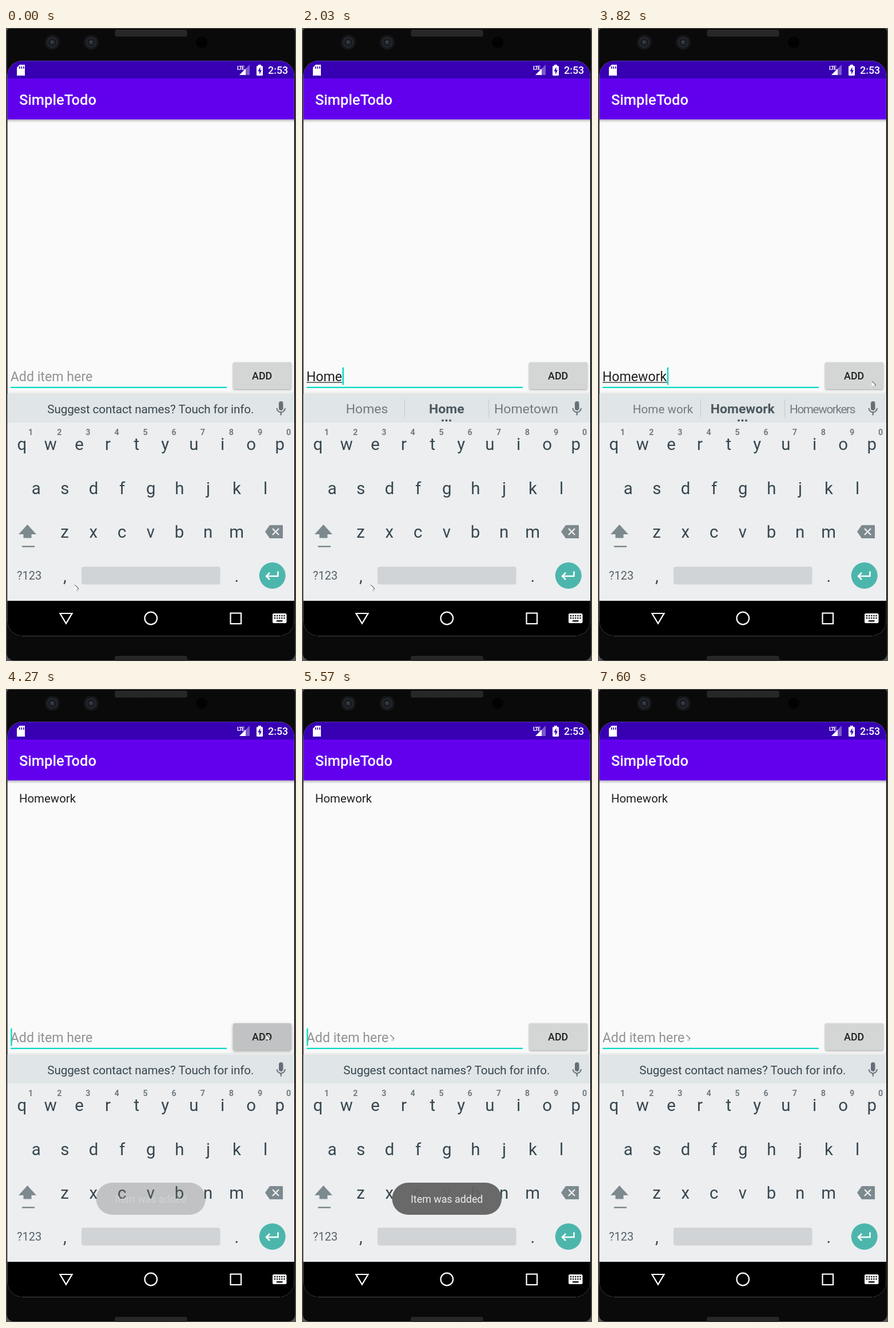
These frames come from a looping animation (507 px wide and 1104 px high, 8 s). An HTML page with a canvas:

```html
<!DOCTYPE html>
<html lang="en">
<head>
<meta charset="utf-8">
<title>Todo app</title>
<style>
  html, body { margin: 0; width: 100%; height: 100%; overflow: hidden; background: #0a0a0a; }
  canvas { display: block; }
</style>
</head>
<body>
<canvas id="stage" width="507" height="1104"></canvas>
<script>
const ctx = document.getElementById('stage').getContext('2d');
const LOOP = 8000;
const FONT = 'Roboto, sans-serif';
const SP = 1.276; // stage pixels per scaled text unit
const NOTICE = 'Suggest contact names? Touch for info.';
const INK = '#202020', KEY = '#37474f', ICON = '#7c898f', TEAL = '#03dac5', KEYS_BG = '#eceef0';

const WORD = 'Homework';
const TYPE_START = 1490, TYPE_STEP = 150, TYPE_END = 2780;
const CLEAR = 4120, ADDED = 4270, RELEASE = 4420;
const BLINK = 495, STRIP_LAG = 80, POINTER_STEP = 136;

// Pointer path: time, x, y
const PATH = [
  [3700, 479, 616], [3900, 455, 603], [4300, 455, 603],
  [4540, 313, 621], [4800, 172, 620], [5200, 154, 603]
];

const clamp = v => Math.max(0, Math.min(1, v));
const mix = (a, b, u) => a + (b - a) * u;

function typed(t) {
  if (t >= CLEAR) return '';
  return WORD.slice(0, Math.max(0, Math.floor((t - TYPE_START) / TYPE_STEP) + 1));
}

function suggestions(word) {
  if (!word) return null;
  return word.length > 4 ? ['Home work', word, 'Homeworkers'] : ['Homes', word, 'Hometown'];
}

// The caret stays lit while typing and blinks from the latest edit on.
function caretVisible(t) {
  if (t < 530) return false;
  if (t >= TYPE_START && t < TYPE_END) return true;
  const from = [CLEAR, TYPE_END, 530].find(edit => edit <= t);
  return Math.floor((t - from) / BLINK) % 2 === 0;
}

function toastAlpha(t) {
  const shown = clamp((t - 4160) / 330);
  const gone = clamp((t - 6100) / 540);
  return 0.95 * shown * (1 - gone * gone);
}

function pointerAt(t) {
  const time = 3430 + Math.floor((t - 3430) / POINTER_STEP) * POINTER_STEP;
  const [t0, x0, y0] = PATH[0];
  if (time < t0) {
    const u = 1 - (1 - clamp((time - 3300) / (t0 - 3300))) ** 1.6;
    return [mix(120, x0, u), mix(971, y0, u)];
  }
  const i = PATH.findIndex(p => p[0] > time);
  if (i < 0) return PATH.at(-1).slice(1);
  const [a, b] = [PATH[i - 1], PATH[i]];
  const u = (time - a[0]) / (b[0] - a[0]);
  return [mix(a[1], b[1], u), mix(a[2], b[2], u)];
}

function rect(x, y, w, h, color, r = 0) {
  ctx.fillStyle = color;
  ctx.beginPath();
  ctx.roundRect(x, y, w, h, r);
  ctx.fill();
}

function disc(x, y, r, color) {
  ctx.fillStyle = color;
  ctx.beginPath();
  ctx.arc(x, y, r, 0, Math.PI * 2);
  ctx.fill();
}

function trace(points, closed) {
  ctx.beginPath();
  points.forEach(([x, y]) => ctx.lineTo(x, y));
  if (closed) ctx.closePath();
}

function poly(points, color) {
  trace(points, true);
  ctx.fillStyle = color;
  ctx.fill();
}

function line(points, color, width, closed = false) {
  trace(points, closed);
  ctx.strokeStyle = color;
  ctx.lineWidth = width;
  ctx.stroke();
}

function setFont(size, weight = 400, spacing = 0) {
  ctx.font = `${weight} ${size}px ${FONT}`;
  ctx.letterSpacing = `${spacing}px`;
}

function text(str, x, y, color, size, { weight = 400, spacing = 0, align = 'left' } = {}) {
  setFont(size, weight, spacing);
  ctx.textAlign = align;
  ctx.fillStyle = color;
  ctx.fillText(str, x, y);
}

// Long labels get a smaller size and, if needed, tighter tracking.
function stripLabel(str, x, max, color, weight = 400) {
  let size = 18 * SP, spacing = 0;
  setFont(size, weight);
  if (ctx.measureText(str).width > max) {
    size *= 0.9;
    setFont(size, weight);
    spacing = Math.min(0, (max - ctx.measureText(str).width) / str.length);
  }
  text(str, x, 672, color, size, { weight, spacing, align: 'center' });
}

function fade(y0, y1, from, to) {
  const g = ctx.createLinearGradient(0, y0, 0, y1);
  g.addColorStop(0, from);
  g.addColorStop(1, to);
  ctx.fillStyle = g;
  ctx.fillRect(2, y0, 502, y1 - y0);
}

function speaker(y, h) {
  rect(190, y, 127, h, '#252525', 4);
  for (let j = 1; j < h - 1; j += 3)
    for (let i = 2 + j % 2; i < 125; i += 3) rect(190 + i, y + j, 1, 1, '#363636');
}

function body() {
  rect(0, 0, 507, 1104, '#555');
  rect(1.5, 1, 504, 1102, '#0a0a0a', [5, 5, 12, 12]);
  speaker(3, 12);
  speaker(1095, 9);
  for (const x of [81, 149]) {
    disc(x, 25, 13, '#15171a');
    disc(x, 25, 9.5, '#24272b');
    disc(x, 25, 7, '#17191d');
    disc(x, 25, 4, '#2b2f37');
    disc(x - 1, 24, 1.5, '#454b56');
  }
  disc(342, 25, 10, '#020202');
}

function statusBar() {
  const bar = '#3700b3';
  rect(2, 57, 502, 31, bar);
  poly([[24, 64], [33, 64], [33, 83], [19, 83], [19, 69]], '#fff');
  for (let i = 0; i < 3; i++) rect(23 + i * 3.5, 67, 1.6, 4, bar);
  text('LTE', 404, 73, '#fff', 9.5, { weight: 700, spacing: -1.1 });
  poly([[426, 64], [426, 82], [408, 82]], 'rgba(255,255,255,.35)');
  poly([[419, 71], [419, 82], [408, 82]], '#fff');
  rect(438, 66, 11, 17, '#fff', 1.5);
  rect(441, 64, 5, 3, '#fff');
  poly([[444.5, 68], [440.5, 75.5], [443, 75.5], [443, 81], [447, 73.5], [444.5, 73.5]], bar);
  text('2:53', 458, 80, '#fff', 14 * SP, { weight: 500 });
}

function appBar() {
  rect(2, 88, 502, 71.5, '#6200ee');
  fade(159.5, 165, 'rgba(0,0,0,.25)', 'rgba(0,0,0,0)');
  text('SimpleTodo', 22.9, 133.6, '#fff', 20 * SP, { weight: 500 });
}

function entryRow(value, caretOn, pressed) {
  text(value || 'Add item here', 7.7, 616, value ? INK : '#929292', 23.2);
  const width = value && ctx.measureText(value).width;
  if (value) rect(8, 617.5, width, 1.3, INK);
  rect(8, 625.7, 378, 2.4, TEAL);
  if (caretOn) rect(8.2 + width, 592, 2.4, 30.5, TEAL);

  ctx.save();
  ctx.shadowColor = 'rgba(0,0,0,.35)';
  ctx.shadowBlur = pressed ? 5 : 3;
  ctx.shadowOffsetY = pressed ? 2 : 1.2;
  rect(397, 583, 102, 47, pressed ? '#c1c2c3' : '#d4d6d6', 2.5);
  ctx.restore();
  text('ADD', 447.6, 613, INK, 14 * SP, { weight: 500, align: 'center' });
}

function suggestionStrip(words) {
  fade(632, 638, 'rgba(0,0,0,0)', 'rgba(0,0,0,.07)');
  rect(2, 638, 502, 50, '#e0e5e7');
  if (words) {
    const side = '#707b81', main = '#4b585f';
    stripLabel(words[0], 113.5, 114, side);
    stripLabel(words[1], 252.8, 116, main, 700);
    stripLabel(words[2], 392, 114, side);
    for (const x of [179.5, 326.5]) rect(x - 0.6, 648, 1.2, 31, '#c6ccd0');
    for (const dx of [-6.5, 0, 6.5]) disc(252.5 + dx, 684.5, 1.9, main);
  } else {
    stripLabel(NOTICE, 252.8, 361, KEY);
  }
  const mic = '#657177';
  rect(477, 651, 7.5, 16, mic, 3.75);
  ctx.beginPath();
  ctx.arc(480.7, 663, 7.2, 0, Math.PI);
  ctx.strokeStyle = mic;
  ctx.lineWidth = 2;
  ctx.stroke();
  rect(479.6, 670, 2.2, 5.5, mic);
}

function keyRow(keys, x0, y, color = KEY, size = 29.4, weight = 400) {
  [...keys].forEach((k, i) => text(k, x0 + i * 50.1, y, color, size, { weight, align: 'center' }));
}

function keyboard() {
  rect(2, 688, 502, 311, KEYS_BG);
  keyRow('1234567890', 43.2, 709.5, '#717c82', 14.3, 700);
  keyRow('qwertyuiop', 27.8, 736);
  keyRow('asdfghjkl', 52.8, 812.5);
  keyRow('zxcvbnm', 102.6, 889);
  keyRow(',', 102.8, 966);
  keyRow('.', 403.3, 966);
  text('?123', 19, 962, '#546168', 20);
  rect(132, 939.5, 242.5, 31, '#d1d4d6', 4);

  poly([[22, 883], [37.5, 866], [53, 883], [44.5, 883], [44.5, 889.5], [30.5, 889.5], [30.5, 883]], ICON);
  rect(28, 903, 22, 2.4, ICON);
  poly([[453, 878.5], [461, 867], [484, 867], [484, 890], [461, 890]], ICON);
  line([[466, 873], [477, 884]], KEYS_BG, 2.4);
  line([[477, 873], [466, 884]], KEYS_BG, 2.4);

  disc(465.7, 955, 23, '#4db6ac');
  line([[475.5, 947.5], [475.5, 956], [456, 956]], '#fff', 2.5);
  line([[461, 950], [455, 956], [461, 962]], '#fff', 2.5);
}

function navBar() {
  rect(2, 999, 502, 61, '#000');
  line([[94.5, 1021], [115.5, 1021], [105, 1038.5]], '#fff', 2.2, true);
  ctx.beginPath();
  ctx.arc(253.3, 1029.5, 10.8, 0, Math.PI * 2);
  ctx.stroke();
  ctx.strokeRect(392.5, 1020.5, 18.5, 18.5);
  rect(466, 1021, 24.5, 17, '#fff', 2);
  for (let row = 0; row < 2; row++)
    for (let col = 0; col < 5; col++)
      rect(469 + col * 4.1, 1024 + row * 4, 2.2, 2.2, '#000');
  rect(473, 1033, 10.5, 2.2, '#000');
}

function toast(alpha) {
  ctx.globalAlpha = alpha;
  rect(157.5, 861, 191.5, 56, '#626262', 28);
  text('Item was added', 253.2, 896, '#f4f4f4', 14 * SP, { align: 'center' });
  ctx.globalAlpha = 1;
}

function pointer(x, y) {
  ctx.save();
  ctx.translate(x, y);
  poly([[0, 0], [0, 9], [2.2, 7.3], [4, 11.5], [6, 10.6], [4.4, 6.8], [7.5, 6.8]], '#fff');
  line([[0.3, 0.3], [7.3, 7]], '#222', 1);
  line([[7.3, 7], [4.4, 7], [6.2, 11]], '#777', 0.8);
  line([[2.2, 8], [4, 11.6]], '#999', 0.7);
  ctx.restore();
}

function draw(t) {
  body();
  ctx.save();
  ctx.beginPath();
  ctx.roundRect(2.5, 57.3, 501.3, 1003, 26);
  ctx.clip();
  rect(2, 57, 502, 1004, '#fafafa');
  statusBar();
  appBar();
  if (t >= ADDED) text(WORD, 22.9, 198, INK, 16 * SP);
  entryRow(typed(t), caretVisible(t), t >= CLEAR && t < RELEASE);
  suggestionStrip(suggestions(typed(t - STRIP_LAG)));
  keyboard();
  navBar();
  ctx.restore();
  toast(toastAlpha(t));
  pointer(...pointerAt(t));
}

const start = performance.now();
function tick() {
  draw((performance.now() - start) % LOOP);
  requestAnimationFrame(tick);
}
tick();
</script>
</body>
</html>
```
